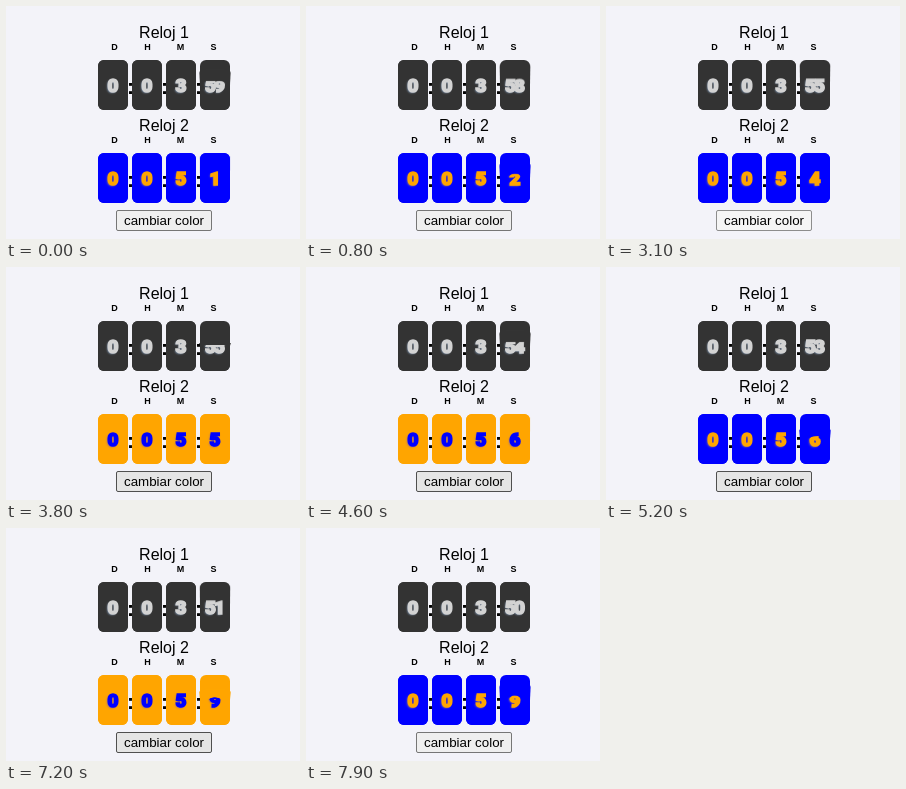
Write an HTML page that moves like this. It is 294 by 233 pixels and loops after 8 s.

```html
<!DOCTYPE html>
<html lang="es">
<head>
<meta charset="utf-8">
<title>Relojes</title>
<style>
  html, body {
    margin: 0;
    width: 100%;
    height: 100%;
    overflow: hidden;
    background: #f3f3f9;
  }
  body {
    position: relative;
    font-family: "Liberation Sans", Arial, sans-serif;
    color: #000;
  }
  .clock {
    --card: #333;
    --ink: #d3d3d3;
    --shade: #8196b0;
    position: absolute;
    left: 92px;
    width: 132px;
    height: 104px;
  }
  #down { top: 0; }
  #up { top: 93px; --card: #00f; --ink: #ffa500; --shade: #a08070; }
  #up.swapped { --card: #ffa500; --ink: #00f; --shade: #8060a0; }

  .title, .label, .card, .colon { position: absolute; text-align: center; }
  .title { top: 18px; width: 132px; font-size: 16px; line-height: 18px; }
  .label { top: 36px; width: 33px; font: bold 9px/11px "Liberation Sans", Arial, sans-serif; }
  .card {
    top: 54px;
    width: 30px;
    height: 50px;
    border-radius: 6px;
    background: var(--card);
    perspective: 400px;
  }
  .half {
    box-sizing: border-box;
    height: 25px;
    padding-right: 1.8px;
    overflow: hidden;
    background: var(--card);
    font-family: Roboto, sans-serif;
    font-size: 19px;
    font-weight: 900;
    font-stretch: 87%;
    letter-spacing: -1.8px;
    color: var(--ink);
    -webkit-text-stroke: 1.6px var(--ink);
    text-shadow: -1px 1px 2px var(--shade);
  }
  /* Both line heights centre the digit on the same point of the card. */
  .top { line-height: 52px; border-radius: 6px 6px 0 0; transform-origin: bottom; }
  .bottom { line-height: 2px; border-radius: 0 0 6px 6px; }
  .colon {
    top: 70px;
    width: 8px;
    font: bold 21px/22px "Liberation Sans", Arial, sans-serif;
  }
  button {
    position: absolute;
    left: 110px;
    top: 204px;
    width: 96px;
    height: 21px;
    box-sizing: border-box;
    margin: 0;
    padding: 0;
    border: 1px solid #767676;
    border-radius: 2px;
    background: #efefef;
    color: #000;
    font: 13.333px/19px "Liberation Sans", Arial, sans-serif;
    white-space: nowrap;
  }
  button.over { background: #e5e5e5; border-color: #4f4f4f; }
  button.pressed { background: #f5f5f5; border-color: #8d8d8d; }
</style>
</head>
<body>
<div class="clock" id="down"></div>
<div class="clock" id="up"></div>
<button type="button">cambiar color</button>
<script>
  const LOOP = 8000, STEP = 100, TICK = 920;
  const ENTER = 2500, LEAVE = 7700, PRESS = 200;
  const CLICKS = [3200, 4900, 6400, 7600];
  const TILT = -90;

  function add(parent, cls, text, left = 0) {
    const el = document.createElement("div");
    el.className = cls;
    el.textContent = text;
    el.style.left = left + "px";
    parent.append(el);
    return el;
  }

  // Builds one clock and returns the two halves of its seconds card.
  function build(id, title, values) {
    const clock = document.getElementById(id);
    add(clock, "title", title);
    const cards = values.map((value, i) => {
      const x = 34 * i;
      add(clock, "label", "DHMS"[i], 33 * i);
      const card = add(clock, "card", "", x);
      if (i) add(clock, "colon", ":", x - 5.5);
      return {
        top: add(card, "half top", value),
        bottom: add(card, "half bottom", value)
      };
    });
    return cards[3];
  }

  const down = build("down", "Reloj 1", [0, 0, 3, 59]);
  const up = build("up", "Reloj 2", [0, 0, 5, 1]);
  const upClock = document.getElementById("up");
  const button = document.querySelector("button");

  // The top flap rises, rests flat, then folds down before the next number.
  function tilt(phase) {
    const rising = 1 - phase / 0.26;
    const falling = (phase - 0.6) / 0.4;
    return TILT * Math.max(0, rising, falling);
  }

  function flip(card, ticks, valueAt) {
    const count = Math.floor(ticks);
    card.top.textContent = card.bottom.textContent = valueAt(count);
    card.top.style.transform = `rotateX(${tilt(ticks - count)}deg)`;
  }

  function draw(t) {
    flip(down, (t + 770) / TICK, n => 59 - n);
    flip(up, (t + 220) / TICK, n => 1 + n);
    const clicks = CLICKS.filter(c => c <= t).length;
    upClock.classList.toggle("swapped", clicks % 2 === 1);
    button.classList.toggle("over", t >= ENTER && t < LEAVE);
    button.classList.toggle("pressed", CLICKS.some(c => t >= c - PRESS && t < c));
  }

  const start = performance.now();
  function frame() {
    const t = (performance.now() - start) % LOOP;
    draw(Math.floor(t / STEP) * STEP);
    requestAnimationFrame(frame);
  }
  frame();
</script>
</body>
</html>
```
